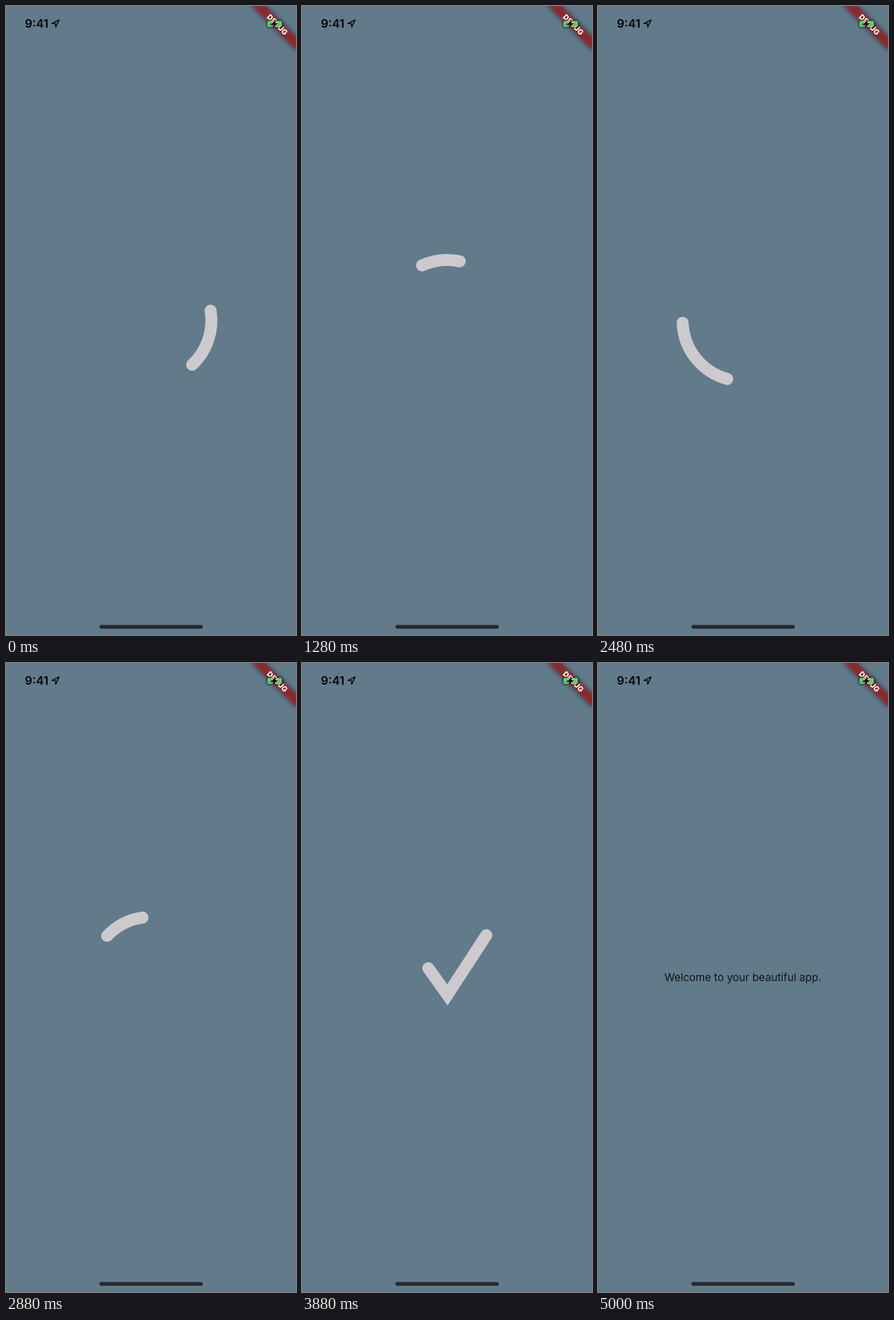
Write an HTML page that moves like this. It is 509 px wide and 1101 px high and loops after 5.12 s.

```html
<!DOCTYPE html>
<html lang="en">
<head>
<meta charset="utf-8">
<title>Loader</title>
<style>
  html, body { margin: 0; width: 100%; height: 100%; overflow: hidden; background: #617b8b; }
  svg { display: block; width: 100vw; height: 100vh; }
  text { font-family: Inter, "Open Sans", sans-serif; }
  .line { fill: none; stroke: #cccacd; stroke-width: 21; stroke-linecap: round; }
</style>
</head>
<body>
<svg viewBox="0 0 509 1101">
  <defs>
    <linearGradient id="edge">
      <stop offset="0" stop-opacity="0"/>
      <stop offset=".3" stop-opacity=".016"/>
      <stop offset=".6" stop-opacity=".07"/>
      <stop offset="1" stop-opacity=".22"/>
    </linearGradient>
    <filter id="blur" x="-30%" y="-150%" width="160%" height="400%">
      <feGaussianBlur stdDeviation="5.4"/>
    </filter>
    <path id="bolt" d="M473.5 24.5 L465.8 32.2 H470.6 L468.6 38 L476.6 30 H471.8 Z"/>
    <mask id="gap" maskUnits="userSpaceOnUse" x="450" y="18" width="45" height="28">
      <rect x="450" y="18" width="45" height="28" fill="#fff"/>
      <use href="#bolt" stroke="#000" stroke-width="3"/>
    </mask>
  </defs>

  <rect width="509" height="1101" fill="#617b8b"/>
  <g id="loader">
    <path id="arc" class="line"/>
    <path id="check" class="line" pathLength="1" d="M221.7 534.2 L255.2 581 L323.5 476.5"/>
  </g>

  <g id="page">
    <rect id="shade" x="-25.5" width="25.5" height="1101" fill="url(#edge)"/>
    <rect width="510" height="1101" fill="#617b8b"/>
    <text x="254" y="557" font-size="18.7" text-anchor="middle" fill="#111518">Welcome to your beautiful app.</text>
  </g>

  <g transform="translate(509 0) rotate(45)">
    <rect x="-54.3" y="38" width="108.6" height="16.3" fill-opacity=".5" filter="url(#blur)"/>
    <rect x="-54.3" y="38" width="108.6" height="16.3" fill="#b71c1c" fill-opacity=".627"/>
    <text y="50.9" font-size="13" font-weight="800" text-anchor="middle" fill="#fff">DEBUG</text>
  </g>

  <text x="33" y="38.3" font-size="20.5" font-weight="600">9:41</text>
  <path d="M80.8 30.4 L93.2 24.2 L87.3 37 L86.6 31 Z" fill="none" stroke="#000" stroke-width="1.7" stroke-linejoin="round"/>
  <g mask="url(#gap)">
    <rect x="457.2" y="24.4" width="28.6" height="13.8" rx="3.6" fill="none" stroke="#000" stroke-opacity=".4" stroke-width="1.5"/>
    <rect x="459.2" y="26.3" width="24.8" height="10" rx="2" fill="#4cd964"/>
  </g>
  <path d="M487.6 29 Q490.4 31.3 487.6 33.8 Z" fill-opacity=".4"/>
  <use href="#bolt"/>
  <rect x="164" y="1083.4" width="181.6" height="6.6" rx="3.3" fill="#2a272d"/>
</svg>
<script>
const LOOP = 5120, STEP = 40, TURN = 1667;
const CX = 254.5, CY = 550.5, R = 106;
const CHECK_AT = 3160, THIN_AT = 3340, CHECK_END = 3680;
const PUSH_AT = 4396, PUSH_TIME = 613;

const el = id => document.getElementById(id);
const [loader, arc, check, page, shade] = ['loader', 'arc', 'check', 'page', 'shade'].map(el);
const progress = (t, from, to) => Math.min(1, Math.max(0, (t - from) / (to - from)));
const point = deg => {
  const a = deg * Math.PI / 180;
  return `${CX + R * Math.cos(a)} ${CY + R * Math.sin(a)}`;
};

// cubic-bezier(.35, .91, .33, .97)
function pushEase(u) {
  if (u <= 0 || u >= 1) return u;
  const curve = (s, a, b) => 3 * a * s * (1 - s) ** 2 + 3 * b * s * s * (1 - s) + s ** 3;
  let lo = 0, hi = 1;
  for (let i = 0; i < 24; i++) {
    const mid = (lo + hi) / 2;
    if (curve(mid, .35, .33) < u) lo = mid; else hi = mid;
  }
  return curve(lo, .91, .97);
}

function drawArc(t) {
  const turn = t / TURN, cos = Math.cos(turn * 2 * Math.PI), sin = Math.sin(turn * 2 * Math.PI);
  const middle = turn * 360 - 8 + 26.8 * cos + 7.6 * sin;
  const half = 31.8 - 3.6 * cos + 13.2 * sin;
  arc.setAttribute('d', `M${point(middle - half)} A${R} ${R} 0 0 1 ${point(middle + half)}`);
}

function drawCheck(t) {
  const drawn = 1 - (1 - progress(t, CHECK_AT, CHECK_END)) ** 3;
  const thin = progress(t, THIN_AT, CHECK_END);
  check.style.strokeDasharray = drawn < 1 ? `${drawn} 2` : 'none';
  check.style.strokeWidth = 31 - 10 * thin * (2 - thin);
}

function draw(t) {
  const done = t > CHECK_AT;
  arc.style.display = done ? 'none' : '';
  check.style.display = done ? '' : 'none';
  if (done) drawCheck(t); else drawArc(t);

  const push = pushEase(progress(t, PUSH_AT, PUSH_AT + PUSH_TIME));
  page.style.display = push > 0 ? '' : 'none';
  page.setAttribute('transform', `translate(${509 * (1 - push)} 0)`);
  loader.setAttribute('transform', `translate(${-509 / 3 * push} 0)`);
  shade.setAttribute('opacity', push);
}

const start = performance.now();
function tick() {
  const t = (performance.now() - start) % LOOP;
  draw(Math.min(Math.floor(t / STEP) * STEP, 5000));
  requestAnimationFrame(tick);
}
tick();
</script>
</body>
</html>
```
